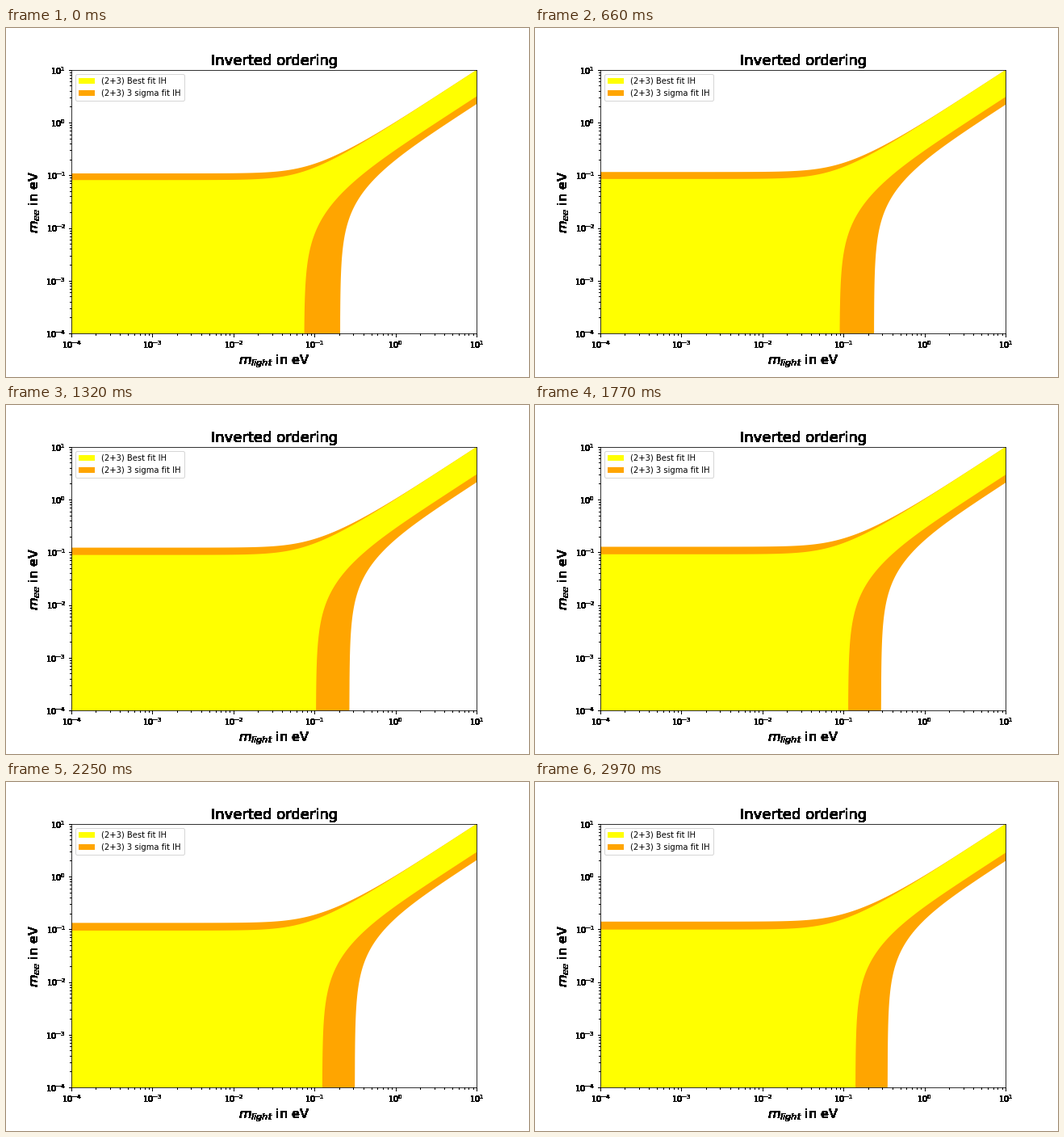
A matplotlib script for the animation above (3 s loop, 648x432 px).

```python
import numpy as np
import matplotlib.pyplot as plt
from matplotlib.animation import FuncAnimation

FRAMES = 100
INTERVAL = 30

plt.rcParams["font.family"] = "DejaVu Sans"

m = np.logspace(-4, 1, 3000)


def band(mix, heavy, light, cancel, s13):
    """Largest and smallest effective mass over all phases."""
    active = (1 - mix) * np.hypot(m, light)
    sterile = mix * np.hypot(m, heavy)
    low = cancel * active - s13 * m - sterile
    return np.maximum(low, 1e-9), active + sterile


def outline(low, high):
    x = np.concatenate([m, m[::-1]])
    y = np.concatenate([high, low[::-1]])
    return np.column_stack([x, y])


def best_fit(t):
    return outline(*band(0.0372 + 0.0218 * t, 0.86, 0.051, 0.39, 0.023))


def three_sigma(t):
    return outline(*band(0.0346 + 0.0203 * t, 1.6, 0.055, 0.3009, 0.03))


def harden(img, dpi):
    """Turn every touched pixel solid black, for unsmoothed lettering."""
    out = np.zeros_like(img)
    out[..., 3] = img[..., 3] > 0
    return out, 0, 0


fig = plt.figure(figsize=(9, 6), dpi=72, facecolor="white")
fig.subplots_adjust(left=0.125, right=0.9, bottom=0.125, top=0.88)
ax = fig.add_subplot()
ax.set_xscale("log")
ax.set_yscale("log")

best, = ax.fill(*best_fit(0).T, color="yellow", lw=0, zorder=1.2,
                label="(2+3) Best fit IH")
sigma, = ax.fill(*three_sigma(0).T, color="orange", lw=0, zorder=1.1,
                 label="(2+3) 3 sigma fit IH")

ax.set_xlim(1e-4, 10)
ax.set_ylim(1e-4, 10)
ax.set_title("Inverted ordering", fontsize=18)
ax.set_xlabel(r"$m_{light}$ in eV", fontsize=16)
ax.set_ylabel(r"$m_{ee}$ in eV", fontsize=16)
ax.legend(loc="upper left", fontsize=10)

for part in (ax.xaxis, ax.yaxis, ax.title):
    part.set_agg_filter(harden)


def update(i):
    t = i / (FRAMES - 1)
    best.set_xy(best_fit(t))
    sigma.set_xy(three_sigma(t))
    return best, sigma


anim = FuncAnimation(fig, update, frames=FRAMES, interval=INTERVAL,
                     repeat=True, repeat_delay=0, blit=False)
plt.show()
```
